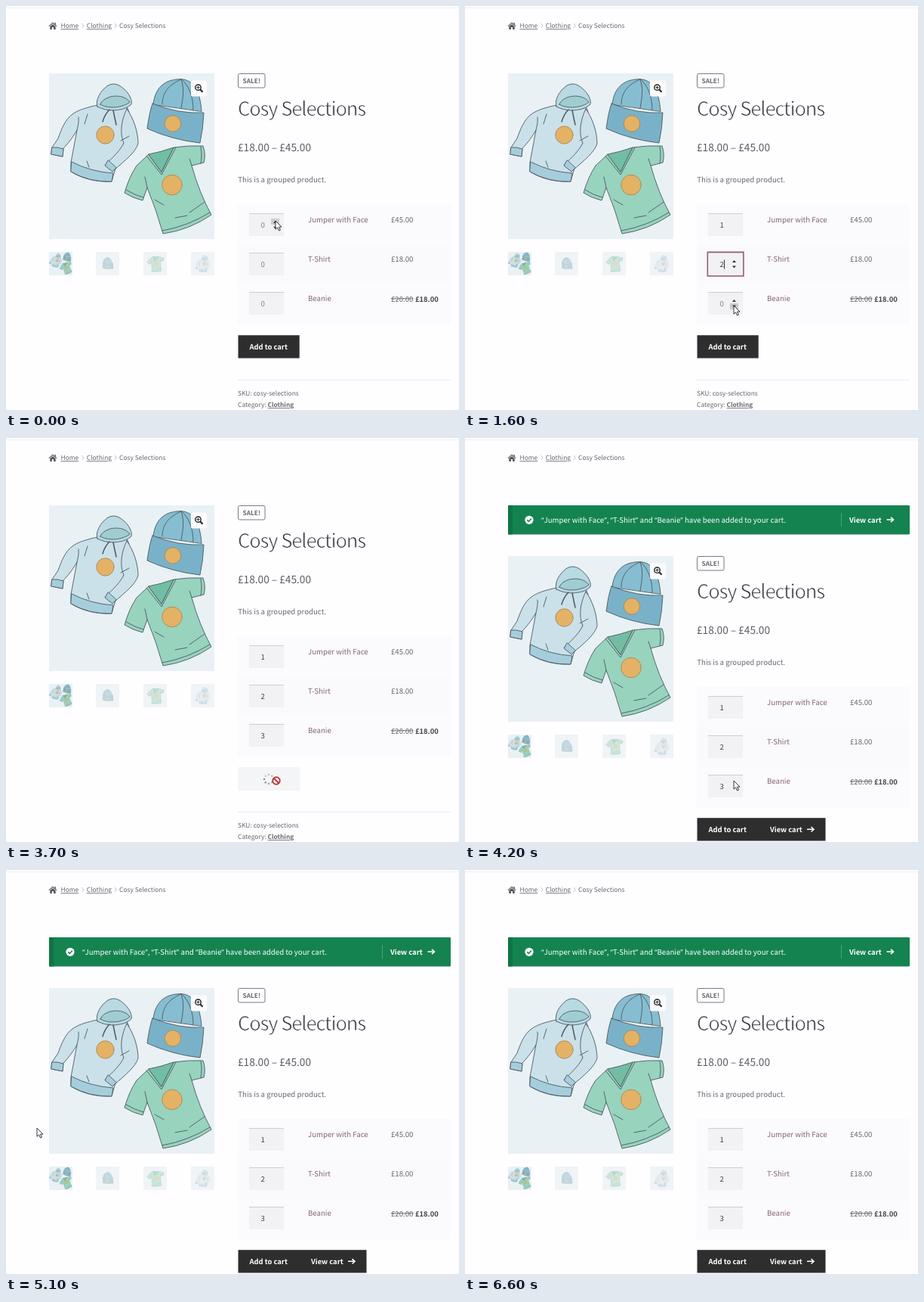
These frames come from a looping animation (600 by 534 pixels, 6.8 s). An HTML page:

```html
<!DOCTYPE html>
<html lang="en">
<head>
<meta charset="utf-8">
<title>Shop product page</title>
<style>
  html, body { margin: 0; width: 100%; height: 100%; overflow: hidden; background: #fefdff; }
  svg { display: block; }
  text { font: 9.66px "Noto Sans CJK KR", "Noto Sans CJK JP", "Noto Sans", sans-serif; fill: #68686b; text-rendering: geometricPrecision; white-space: pre; }
  .small { font-size: 8.45px; }
  .price { font-size: 13.7px; fill: #5c5c60; }
  /* a background-coloured stroke thins the letters to a light weight */
  .title { font-size: 25.6px; letter-spacing: -1.15px; fill: #2f343c; stroke: #fefdff; stroke-width: .8px; }
  .bold { font-weight: 700; font-size: 9.4px; }
  .small.bold { font-size: 8.3px; }
  .dark { fill: #43454b; }
  .white { fill: #fff; }
  .link { fill: #856577; }
  .quote { font-family: "Noto Sans", sans-serif; }
  .under { text-decoration: underline; }
  .ink { stroke: #4a5a63; stroke-width: .9; stroke-linejoin: round; stroke-linecap: round; }
  .line { fill: none; }
  .badge { fill: #e3b265; stroke: #a9885a; }
</style>
</head>
<body>
<svg width="600" height="534" viewBox="0 0 600 534">
  <defs>
    <g id="hoodie" class="ink" fill="#cbe1ea">
      <path d="M121 131C108 134 96 137 88 143C78 150 73 164 69 175L61 187L60 196L75 199L76 188C84 180 90 171 94 164L86 207L86 219C102 229 122 233 140 232L143 221L157 178L163 140L160 133Z"/>
      <path fill="#a6cddb" d="M61 187Q68 186 76 189L75 199L60 196Z M87 206Q112 219 142 221L140 232Q110 233 86 219Z"/>
      <path d="M160 136C170 150 175 168 175 182C171 194 158 204 143 217L131 210C142 200 152 190 156 181C150 168 153 150 160 136Z"/>
      <path fill="#a6cddb" d="M135 204L131 211L141 219L146 214Z"/>
      <path fill="#b9d9e3" d="M121 133C118 124 125 112 135 105Q143 101 150 105C160 111 168 122 166 130C158 137 150 137 143 138C134 138 127 136 121 133Z"/>
      <path fill="#a0cdd1" d="M125 130C130 117 156 115 164 127C156 134 136 137 125 130Z"/>
      <path class="line" d="M94 164Q97 153 96 147M108 143L104 156M107 205L110 213M152 178L163 172"/>
      <path class="line" stroke-width="1.5" d="M137 137Q131 143 128 153M142 138Q144 148 146 157"/>
      <circle class="badge" cx="131.5" cy="170.5" r="11.7"/>
    </g>
    <g id="beanie" class="ink" fill="#87bdd0">
      <path d="M195 130C197 112 206 99 226 97C248 94 257 112 259 139Z"/>
      <path class="line" d="M207 130C207 115 215 104 232 97M232 135C235 118 236 108 232 97M248 138C248 120 243 107 233 97"/>
      <path fill="#79b2c8" d="M194 129Q190 140 187 162Q220 177 257 181Q261 163 262 141Q229 143 194 129Z"/>
      <circle class="badge" cx="221" cy="155.5" r="10.7"/>
    </g>
    <g id="shirt" class="ink" fill="#98d3be">
      <path d="M189 196L173 211Q163 226 157 247Q168 254 181 257L187 240Q199 269 208 301Q243 296 272 276Q256 247 246 211L262 207Q265 196 261 185Q242 184 222 187L206 219Z"/>
      <path fill="#72bda4" d="M189 196Q205 193 222 187L206 219Z"/>
      <path class="line" d="M186 198L206 223L225 187M159 243Q170 250 182 253M258 186Q260 196 258 208M187 240L184 226M246 211L243 202M207 297Q241 291 270 273M197 256L209 263M263 259L243 273M224 280L240 277"/>
      <circle class="badge" cx="220" cy="236.5" r="13.3"/>
    </g>
    <g id="art">
      <rect x="57" y="89" width="219" height="219" fill="#eaf1f5"/>
      <use href="#hoodie"/><use href="#beanie"/><use href="#shirt"/>
    </g>
    <path id="arrow" d="M0 0H9M5.5 -3.2L9 0L5.5 3.2" fill="none" stroke="#fff" stroke-width="1.6"/>
    <path id="chevron" d="M0 -3L2.4 0L0 3" fill="none" stroke="#c4c4c8"/>
  </defs>

  <rect width="600" height="534" fill="#fefdff"/>
  <rect y="2" width="600" height="1" fill="#f0eff3"/>
  <path d="M56.5 26.5L62 21.5L67.5 26.5L66.7 27.3L62 23.1L57.3 27.3Z M58.3 27.2L62 24L65.7 27.2V31H63.1V28H60.9V31H58.3Z M64.4 22H65.8V25H64.4Z" fill="#55565a"/>
  <text class="small under" x="72.5" y="29.3">Home</text>
  <use href="#chevron" x="100.5" y="26"/>
  <text class="small under" x="106.8" y="29.3">Clothing</text>
  <use href="#chevron" x="144" y="26"/>
  <text class="small" x="150" y="29.3">Cosy Selections</text>

  <g id="notice">
    <rect x="57" y="89" width="532" height="38.5" rx="1" fill="#148350"/>
    <rect x="57" y="89" width="6" height="38.5" fill="#0f7445"/>
    <circle cx="85" cy="108.3" r="5.6" fill="#fff"/>
    <path d="M82.3 108.4L84.3 110.4L87.9 106.5" fill="none" stroke="#148350" stroke-width="1.5"/>
    <text id="message" class="white" x="101" y="112"></text>
    <rect x="498" y="99" width="1" height="18" fill="#fff" opacity=".25"/>
    <text class="white bold" x="509" y="112">View cart</text>
    <use href="#arrow" x="558.5" y="108"/>
  </g>

  <g id="page">
    <use href="#art"/>
    <rect x="245" y="98.5" width="21" height="21" rx="2" fill="#fbfafc"/>
    <g fill="none" stroke="#222">
      <circle cx="254.5" cy="107.7" r="3.7" stroke-width="1.4"/>
      <path d="M252.5 107.7H256.5M254.5 105.7V109.7"/>
      <path d="M257.3 110.5L260.5 113.7" stroke-width="2"/>
    </g>
    <use href="#art" transform="translate(57 325) scale(.1416) translate(-57 -89)"/>
    <g opacity=".5">
      <path d="M119 325h31v31h-31zM182 325h31v31h-31zM245 325h31v31h-31z" fill="#e4edf1"/>
      <use href="#beanie" transform="translate(134.5 341) rotate(-13) scale(.19) translate(-225 -140)"/>
      <use href="#shirt" transform="translate(197.5 341) rotate(17) scale(.19) translate(-215 -243)"/>
      <use href="#hoodie" transform="translate(260.5 341) rotate(-10) scale(.17) translate(-120 -168)"/>
    </g>

    <rect x="307.5" y="89.5" width="35.5" height="18.5" rx="2" fill="none" stroke="#6d6e73" stroke-width=".9"/>
    <text class="small bold" x="313.5" y="102.2">SALE!</text>
    <text class="title" x="307" y="145">Cosy Selections</text>
    <text class="price" x="307" y="192">£18.00 – £45.00</text>
    <text x="307.3" y="232.5">This is a grouped product.</text>
    <rect x="307" y="262" width="282" height="159" fill="#fbfafc"/>
    <rect x="307" y="314" width="282" height="52" fill="#faf9fb"/>
    <text x="510" y="286">£45.00</text>
    <text x="510" y="338.3">£18.00</text>
    <text x="510" y="390.5" text-decoration="line-through">£20.00</text>
    <text class="bold dark" x="542" y="390.5">£18.00</text>
    <g id="rows"></g>
    <g id="button"></g>
    <rect x="307" y="494" width="282" height="1" fill="#ededf1"/>
    <text class="small" x="307" y="515.2">SKU: cosy-selections</text>
    <text class="small" x="307" y="530.2">Category: <tspan class="small bold under">Clothing</tspan></text>
  </g>
  <g id="pointer"></g>
</svg>
<script>
const $ = id => document.getElementById(id);
const LOOP = 6800, LAST = 6600, CLICK = 3400, ADDED = 4100, GONE = 5300, SHIFT = 67;

// clicks: times at which the quantity goes up by one
const items = [
  { name: 'Jumper with Face', y: 274, clicks: [300] },
  { name: 'T-Shirt', y: 326, clicks: [1000, 1300] },
  { name: 'Beanie', y: 378, clicks: [2000, 2200, 2700] }
];

// pointer path: time, x, y
const path = [
  [0, 357, 284], [600, 357, 284], [900, 357, 336], [1300, 357, 336], [1600, 356, 396],
  [1900, 359, 389], [2800, 359, 389], [3200, 352, 446], [3500, 352, 448], [3700, 358, 453],
  [4200, 356, 453], [4800, 101, 350], [4900, 101, 350], [5200, 20, 338]
];

const quoted = s => `<tspan class="quote">“</tspan>${s}<tspan class="quote">”</tspan>`;
const [a, b, c] = items.map(i => quoted(i.name));
$('message').innerHTML = `${a}, ${b} and ${c} have been added to your cart.`;

function pointerAt(t) {
  const i = path.findIndex(p => p[0] > t);
  if (i < 0) return path[path.length - 1].slice(1);
  const [t0, x0, y0] = path[i - 1], [t1, x1, y1] = path[i];
  const u = (t - t0) / (t1 - t0), k = u * u * (3 - 2 * u);
  return [x0 + (x1 - x0) * k, y0 + (y1 - y0) * k];
}

function row({ name, y, clicks }, t, focused, px, py) {
  const count = clicks.filter(at => at <= t).length;
  const hover = t < ADDED && px > 322 && px < 368 && py > y && py < y + 30;
  let s = `<rect x="322" y="${y}" width="46" height="30" fill="#f2f1f3"/>
    <rect x="322" y="${y}" width="46" height="1" fill="#cfcdd1"/>
    <text x="337.4" y="${y + 19}" fill-opacity="${count ? 1 : .8}" class="${count ? 'dark' : ''}">${count}</text>
    <text class="link" x="400" y="${y + 12.2}">${name}</text>`;
  if (hover) s += `<rect x="351" y="${y + (py < y + 15 ? 7 : 15)}" width="11" height="8" fill="#cbcacd"/>`;
  if (hover || focused)
    s += `<path d="M354 ${y + 13}l2.5 -3l2.5 3zM354 ${y + 17.5}l2.5 3l2.5 -3z" fill="#333"/>`;
  if (focused)
    s += `<rect x="321.3" y="${y - .7}" width="47.6" height="31.6" fill="none" stroke="#995a7c" stroke-width="1.6"/>
      <rect x="343" y="${y + 9.5}" width="1" height="12" fill="#333"/>`;
  return s;
}

function button(t) {
  if (t >= CLICK && t < ADDED) {
    let s = '<rect x="307.5" y="435" width="81.5" height="31" rx="1" fill="#f4f5f6"/>';
    for (let i = 0; i < 8; i++) {
      const g = (i + t / 100) * Math.PI / 4;
      s += `<circle cx="${348 + 6 * Math.cos(g)}" cy="${451 + 6 * Math.sin(g)}" r="1.2" fill="#777b82" opacity="${.35 + i * .08}"/>`;
    }
    return s;
  }
  const added = t >= ADDED;
  return `<rect x="307.5" y="435.2" width="${added ? 170 : 81.2}" height="30.3" fill="#2e2e2f"/>
    <text class="white bold" x="322.5" y="454">Add to cart</text>` +
    (added ? '<text class="white bold" x="404" y="454">View cart</text><use href="#arrow" x="453" y="450.3"/>' : '');
}

function pointer(t, x, y) {
  if (t >= GONE) return '';
  const onButton = t < ADDED && x > 307 && x < 389 && y > 435 && y < 466;
  let shape = '<path d="M0 0V11.2L2.6 8.8L4.5 13L6.4 12.2L4.6 8.1H8Z" fill="#fff" stroke="#222" stroke-width=".9"/>';
  if (onButton && t >= CLICK)
    shape = '<circle r="4.7" fill="#fff" stroke="#b93a35" stroke-width="2"/><path d="M-3.3 -3.3L3.3 3.3" stroke="#b93a35" stroke-width="2"/>';
  else if (onButton)
    shape = '<path d="M-1 1Q0 -1 1 1V5L6 6Q7 6 7 8V10L5 14H-1L-4 9Q-4 7 -1 9Z" fill="#fff" stroke="#222" stroke-width=".9"/>';
  return `<g transform="translate(${x} ${y})">${shape}</g>`;
}

function draw(now) {
  const t = Math.min(Math.floor(now % LOOP / 100) * 100, LAST);
  const [x, y] = pointerAt(t);
  const focus = t < CLICK ? items.findLastIndex(i => i.clicks[0] <= t) : -1;
  $('page').setAttribute('transform', `translate(0 ${t >= ADDED ? SHIFT : 0})`);
  $('notice').setAttribute('visibility', t >= ADDED ? 'visible' : 'hidden');
  $('rows').innerHTML = items.map((item, i) => row(item, t, i === focus, x, y)).join('');
  $('button').innerHTML = button(t);
  $('pointer').innerHTML = pointer(t, x, y);
}

const start = performance.now();
function tick() {
  draw(performance.now() - start);
  requestAnimationFrame(tick);
}
tick();
</script>
</body>
</html>
```
